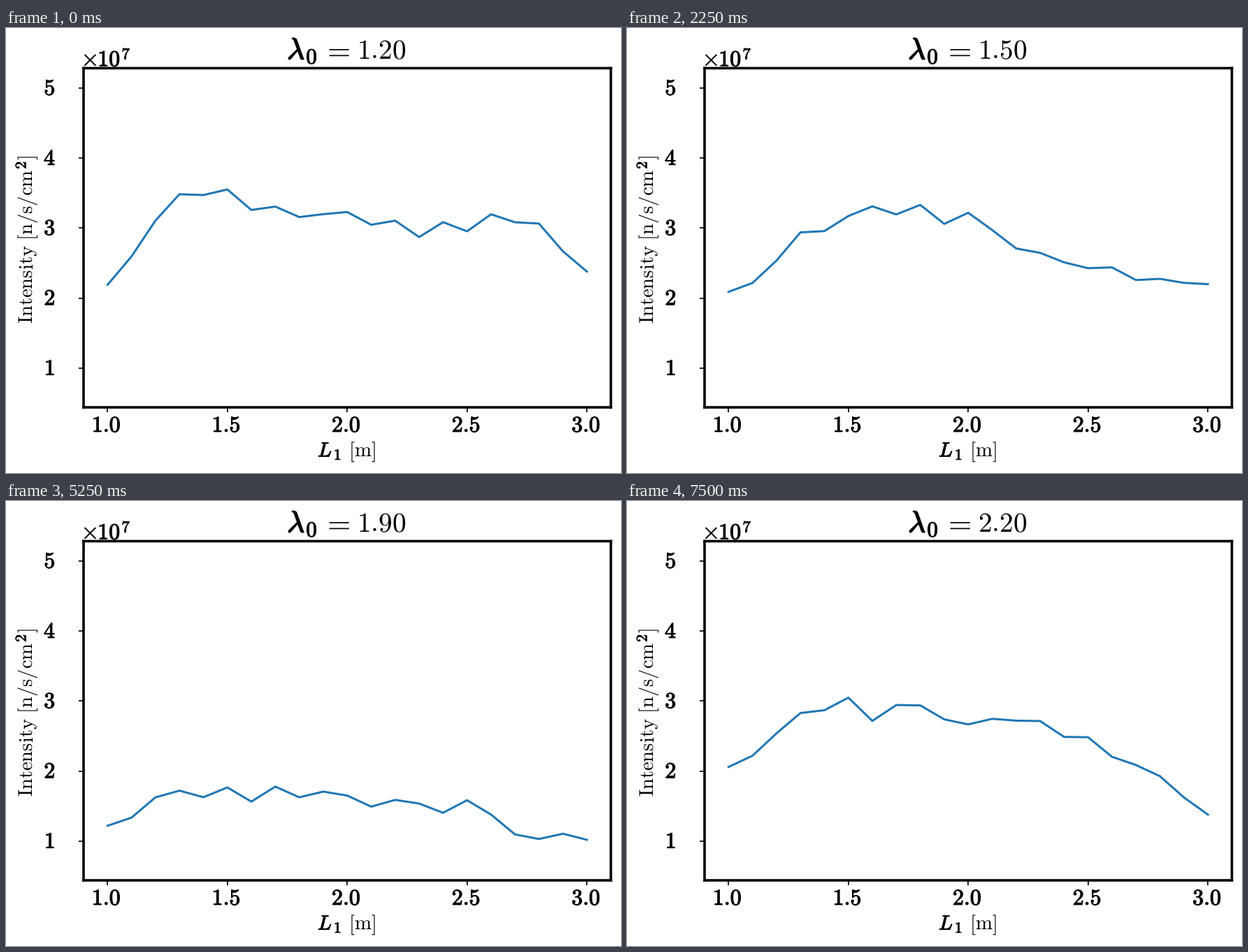
Animation of 880x637 px, one loop 8 s. Source, as a matplotlib script:

```python
import matplotlib.pyplot as plt
import numpy as np
from matplotlib.animation import FuncAnimation
from matplotlib.patheffects import withStroke

W, H, DPI = 880, 637, 100
PX = 72 / DPI  # points per pixel
STEP, HOLD, LOOP = 250, 750, 8000

plt.rcParams.update({"mathtext.fontset": "cm", "text.hinting": "none"})

L1 = np.linspace(1, 3, 21)
KNOTS = [1, 1.3, 1.7, 2.1, 2.4, 2.8, 3]

# Trend at the knots in units of 1e7, keyed by wavelength
TRENDS = {
    1.2: [2.19, 3.41, 3.37, 3.05, 3.07, 2.97, 2.38],
    1.3: [2.48, 2.95, 3.42, 3.29, 2.83, 2.34, 2.44],
    1.5: [2.09, 2.90, 3.34, 2.90, 2.49, 2.11, 2.20],
    1.7: [1.52, 2.10, 2.20, 2.01, 1.81, 1.73, 1.64],
    1.9: [1.22, 1.68, 1.72, 1.57, 1.47, 1.13, 1.02],
    2.1: [1.73, 2.42, 2.75, 2.20, 2.10, 1.80, 1.53],
    2.2: [2.06, 2.96, 2.85, 2.70, 2.40, 2.10, 1.38],
}
ENDS = {1.4: 1.79, 1.6: 1.33, 1.8: 1.09, 2.0: 1.43}


def scan(wave):
    """Trend blended between wavelengths, with seeded scatter inside the ends."""
    columns = np.array(list(TRENDS.values())).T
    trend = [np.interp(wave, list(TRENDS), column) for column in columns]
    trend[-1] = ENDS.get(wave, trend[-1])
    y = np.interp(L1, KNOTS, trend)
    y[1:-1] += np.random.default_rng(round(wave * 10)).normal(0, 0.1, y.size - 2)
    return y


fig = plt.figure(figsize=(W / DPI, H / DPI), dpi=DPI, facecolor="white")


def put(x, y, text, size, stroke=0, **kw):
    """Math text centred on x with its baseline at y, in pixels from the top."""
    t = fig.text(x / W, 1 - y / H, f"${text}$", fontsize=size * PX, ha="center",
                 va="baseline", color="black", rotation_mode="anchor", **kw)
    if stroke:
        t.set_path_effects([withStroke(linewidth=stroke * PX, foreground="black")])
    return t


def bold(x, y, text, size=32, **kw):
    return put(x, y, rf"\mathbf{{{text}}}", size, size / 30, **kw)


left, right, top, bottom = 111, 865.5, 57.5, 543
ax = fig.add_axes([left / W, 1 - bottom / H, (right - left) / W, (bottom - top) / H])
ax.set(xlim=(0.9, 3.1), ylim=(0.441, 5.284),
       xticks=np.arange(1, 3.1, 0.5), yticks=range(1, 6))
ax.tick_params(length=7 * PX, width=1.7 * PX, labelbottom=False, labelleft=False)
for spine in ax.spines.values():
    spine.set(linewidth=3.6 * PX, snap=False)

for i in range(5):
    bold(143.6 + 171.6 * i, 578, f"{1 + i / 2:.1f}")
    bold(62.5, 496.7 - 100.25 * i, str(i + 1))

# Axis multiplier
put(119, 54.5, r"{\times}", 33, 0.5)
bold(147.5, 54.5, "10")
bold(172, 44.5, "7", 23)

# Axis labels
put(456.5, 613.5, "L", 29, 1.1)
bold(474.5, 618, "1", 22)
put(509, 613.5, r"\mathrm{[m]}", 29)
put(39, 312.5, r"\mathrm{Intensity\ [n/s/cm}", 28.6, rotation=90)
bold(28.5, 196, "2", 22, rotation=90)
put(39, 186, "]", 28.6, rotation=90)

# Title
put(415, 44.5, r"\lambda", 43, 1.7)
bold(437.5, 51, "0", 31)
put(472.5, 44.5, "=", 43)
value = put(537.5, 44.5, "1.20", 39.5)

line, = ax.plot(L1, scan(1.2), color="#1f77b4", lw=3 * PX)


def draw(i):
    wave = (12 + i * STEP // HOLD) / 10
    line.set_ydata(scan(wave))
    value.set_text(f"${wave:.2f}$")
    return line, value


anim = FuncAnimation(fig, draw, frames=LOOP // STEP, interval=STEP, repeat=True,
                     repeat_delay=0, blit=False)
plt.show()
```
